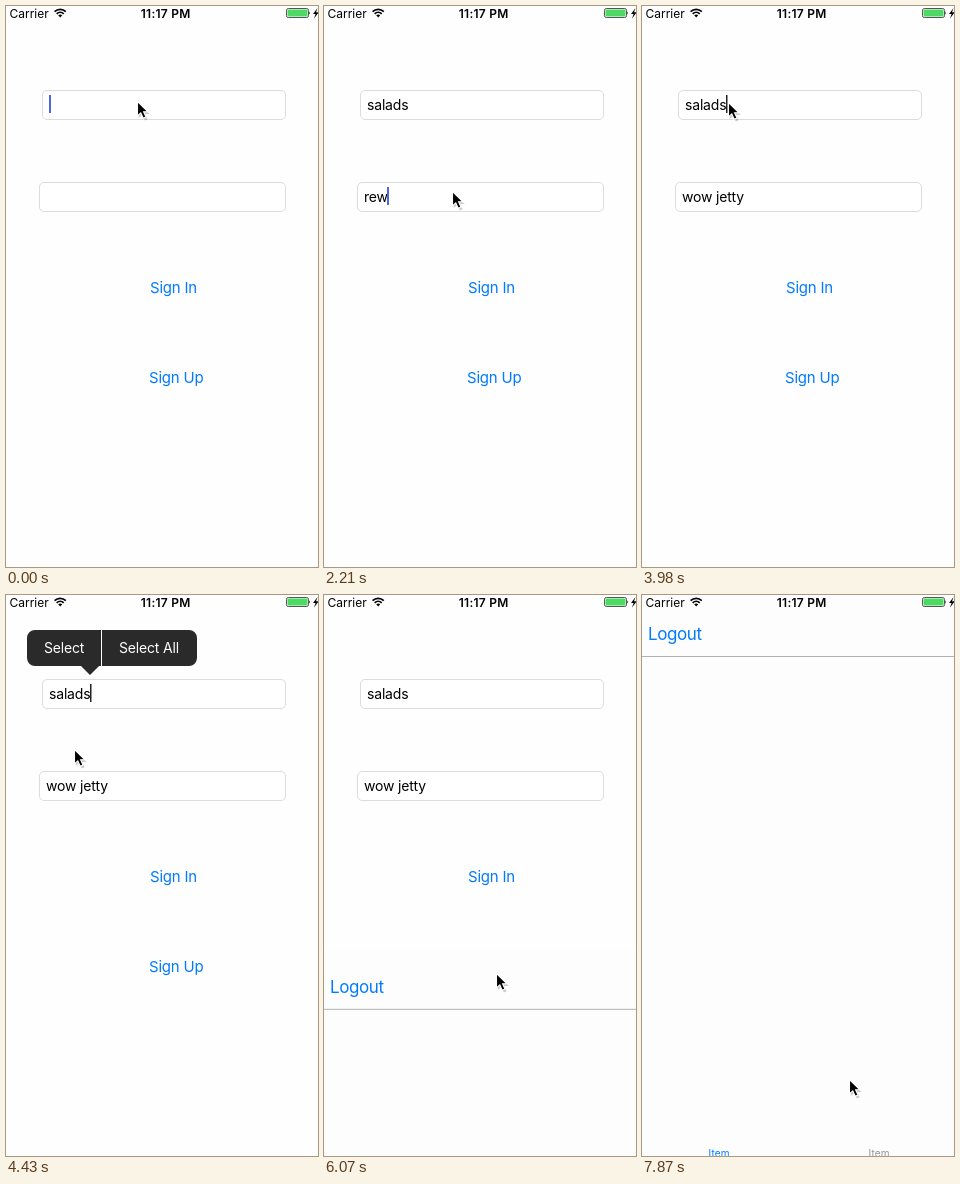
Write an HTML page that moves like this. It is 312x561 px and loops after 8 s.

```html
<!DOCTYPE html>
<html lang="en">
<head>
<meta charset="utf-8">
<title>Sign in form</title>
<style>
  html, body { margin: 0; width: 100%; height: 100%; overflow: hidden; background: #fefefe; }
  svg { display: block; width: 312px; height: 561px; }
  text { font: 14px Inter, "Liberation Sans", sans-serif; letter-spacing: -.18px; white-space: pre; }
  .button { font-size: 15px; letter-spacing: -.22px; fill: #007aff; }
  .field { fill: #fff; stroke: #dcdcdc; }
  .chosen { fill: #cfdeed; }
  .hint path { fill: #fff; stroke: #c0c0c0; }
  .hint text { fill: #1f72d8; }
  .hint .close { stroke: #b4b4b4; stroke-width: 1.1; }
  .menu { fill: #2a2a2a; }
  .menu text { fill: #fff; }
  .tab { font-size: 10px; letter-spacing: .1px; }
  .status text { font-size: 12px; letter-spacing: 0; }
  .status .clock { font-weight: 600; letter-spacing: .25px; }
</style>
</head>
<body>
<svg viewBox="0 0 312 561">
  <rect width="312" height="561" fill="#fefefe"/>

  <g id="login">
    <rect class="field" x="36.5" y="84.5" width="243" height="29" rx="4.5"/>
    <rect class="field" x="33.5" y="176.5" width="246" height="29" rx="4.5"/>
    <rect id="chosen1" class="chosen" x="41" y="89" width="43" height="20"/>
    <rect id="chosen2" class="chosen" x="38" y="181" width="60" height="20"/>
    <text id="input1" x="43" y="103.5"></text>
    <text id="input2" x="40" y="195.5"></text>
    <rect id="caret" width="2" height="18"/>

    <g id="hint1" class="hint">
      <path d="M40.5 109.5H93a10.5 10.5 0 0 1 0 21H43.5q-3 0-3-3z"/>
      <text x="43" y="125">salads</text>
      <path class="close" d="M88 116l8 8m0-8l-8 8"/>
    </g>
    <g id="hint2" class="hint">
      <path d="M37.5 201.5H112a10.5 10.5 0 0 1 0 21H40.5q-3 0-3-3z"/>
      <text x="40" y="217">wow jetty</text>
      <path class="close" d="M107 208l8 8m0-8l-8 8"/>
    </g>

    <text class="button" x="144" y="286.5">Sign In</text>
    <text id="signUp" class="button" x="143" y="376.5">Sign Up</text>

    <g id="menu" class="menu">
      <path d="M29 35H183a8 8 0 0 1 8 8V63a8 8 0 0 1-8 8H93L84 80L75 71H29a8 8 0 0 1-8-8V43a8 8 0 0 1 8-8z"/>
      <path d="M95.5 35V71" stroke="#fff"/>
      <text x="38" y="58">Select</text>
      <text x="113" y="58">Select All</text>
    </g>
  </g>

  <g id="home">
    <rect width="312" height="570" fill="#fdfdfd"/>
    <path d="M0 61.5H312" stroke="#b2b2b2"/>
    <text x="6" y="45" fill="#007aff" style="font-size:17px;letter-spacing:-.4px">Logout</text>
    <text class="tab" x="66.5" y="561.5" fill="#007aff">Item</text>
    <text class="tab" x="226.5" y="561.5" fill="#929292">Item</text>
  </g>

  <g class="status">
    <text x="3.5" y="11.5">Carrier</text>
    <g fill="none" stroke="#000" stroke-width="1.7">
      <path d="M48.6 5.6a8 8 0 0 1 11.2 0M50.7 7.9a5 5 0 0 1 7 0"/>
      <path d="M52.2 9.2L54.2 11.6L56.2 9.2Q54.2 7.8 52.2 9.2z" fill="#000" stroke="none"/>
    </g>
    <text class="clock" x="134.8" y="11.5">11:17 PM</text>
    <rect x="280.5" y="2.5" width="22" height="9" rx="1.8" fill="#fff" stroke="#555"/>
    <rect x="281.5" y="3.5" width="20" height="7" rx=".8" fill="#4cd964"/>
    <path d="M303.3 5.2q1.6 1.8 0 3.6z"/>
    <path d="M311.5 2L307 8h2.6L308 12.5L312.8 6.3H310z"/>
  </g>

  <g id="pointer">
    <path d="M1 1.5V16L4.5 13L7 18.5L9.8 17.3L7.4 12H12z" fill="#000" opacity=".2" transform="translate(.8 1)"/>
    <path d="M.5 .5V14.8L3.8 11.8L6.2 17.2L9 16L6.6 10.8H11z" stroke="#fff" stroke-width="1.1"/>
  </g>
</svg>
<script>
const LOOP = 8000;
const $ = id => document.getElementById(id);
const start = performance.now();

// Each track lists [time, ...values]; a value holds until the next entry.
const pointerTrack = [
  [0, 131, 95], [880, 133, 104], [1030, 131, 144], [1180, 128, 185],
  [2950, 124, 233], [3100, 119, 182], [3240, 113, 127], [3390, 101, 111],
  [3540, 90, 99], [3690, 86, 96], [4280, 78, 124], [4430, 68, 154],
  [4580, 84, 215], [4730, 114, 276], [4880, 142, 328],
  [5030, 156, 364], [5180, 163, 389], [5330, 166, 386], [5630, 174, 377],
  [5780, 172, 378], [6970, 140, 380], [7120, 111, 378], [7270, 136, 421],
  [7420, 164, 466], [7570, 190, 501], [7720, 203, 494], [7870, 207, 484]
];
const input1Track = [
  [0, ""], [140, "d"], [290, "da"], [440, "daf"], [590, "dafa"],
  [730, "dafaf"], [880, "dafafa"], [1470, "salads"]
];
const input2Track = [
  [0, ""], [1760, "r"], [2060, "re"], [2210, "rew"], [2350, "rewt"],
  [2500, "rewtw"], [2800, "rewtwt"], [2950, "rewtwtt"], [3100, "rewtwtty"],
  [3540, "wow jetty"]
];
// Caret: field, opacity, colour
const caretTrack = [
  [0, 1, 1, "#4b69dc"], [880, 1, 1, "#1b2a5c"], [1470, 2, 1, "#4b69dc"],
  [2800, 2, 1, "#1b2a5c"], [3240, 2, .35, "#333"], [3540, 1, 1, "#4b69dc"],
  [3980, 1, 1, "#222"], [4730, 1, .2, "#222"], [5030, 1, 1, "#222"],
  [5630, 1, .25, "#222"], [5780, 1, 0, "#222"]
];
// Top edge of the rising screen: it decays towards zero from the bottom.
const RISE = [5930, 6080, 6230, 6380, 6520];

const at = (track, t) => track.filter(k => k[0] <= t).pop().slice(1);
const show = (id, on) => $(id).setAttribute("visibility", on ? "visible" : "hidden");
const within = (t, a, b) => t >= a && t < b;
const move = (id, x, y) => $(id).setAttribute("transform", `translate(${x} ${y})`);

function homeTop(t) {
  const step = RISE.filter(time => time <= t).pop();
  if (!step) return 570;
  return step === RISE[4] ? 0 : 568 * Math.exp(-(step - 5880) / 105);
}

function drawCaret(t) {
  const [field, opacity, colour] = at(caretTrack, t);
  const input = $("input" + field);
  const width = input.textContent ? input.getComputedTextLength() : 0;
  const caret = $("caret");
  caret.setAttribute("x", Math.round(+input.getAttribute("x") + width - .5));
  caret.setAttribute("y", field === 1 ? 89 : 181);
  caret.setAttribute("width", colour === "#4b69dc" ? 2 : 1.5);
  caret.setAttribute("fill", colour);
  caret.setAttribute("opacity", opacity);
}

function draw(t) {
  $("input1").textContent = at(input1Track, t)[0];
  $("input2").textContent = at(input2Track, t)[0];
  const hint1 = within(t, 1030, 1470), hint2 = within(t, 3100, 3540);
  show("hint1", hint1);
  show("chosen1", hint1);
  show("hint2", hint2);
  show("chosen2", hint2);
  show("menu", within(t, 4130, 5780));
  $("signUp").setAttribute("opacity", within(t, 5780, 5930) ? .3 : 1);
  drawCaret(t);
  move("home", 0, homeTop(t).toFixed(1));
  move("pointer", ...at(pointerTrack, t));
}

function frame() {
  draw((performance.now() - start) % LOOP);
  requestAnimationFrame(frame);
}
frame();
</script>
</body>
</html>
```
